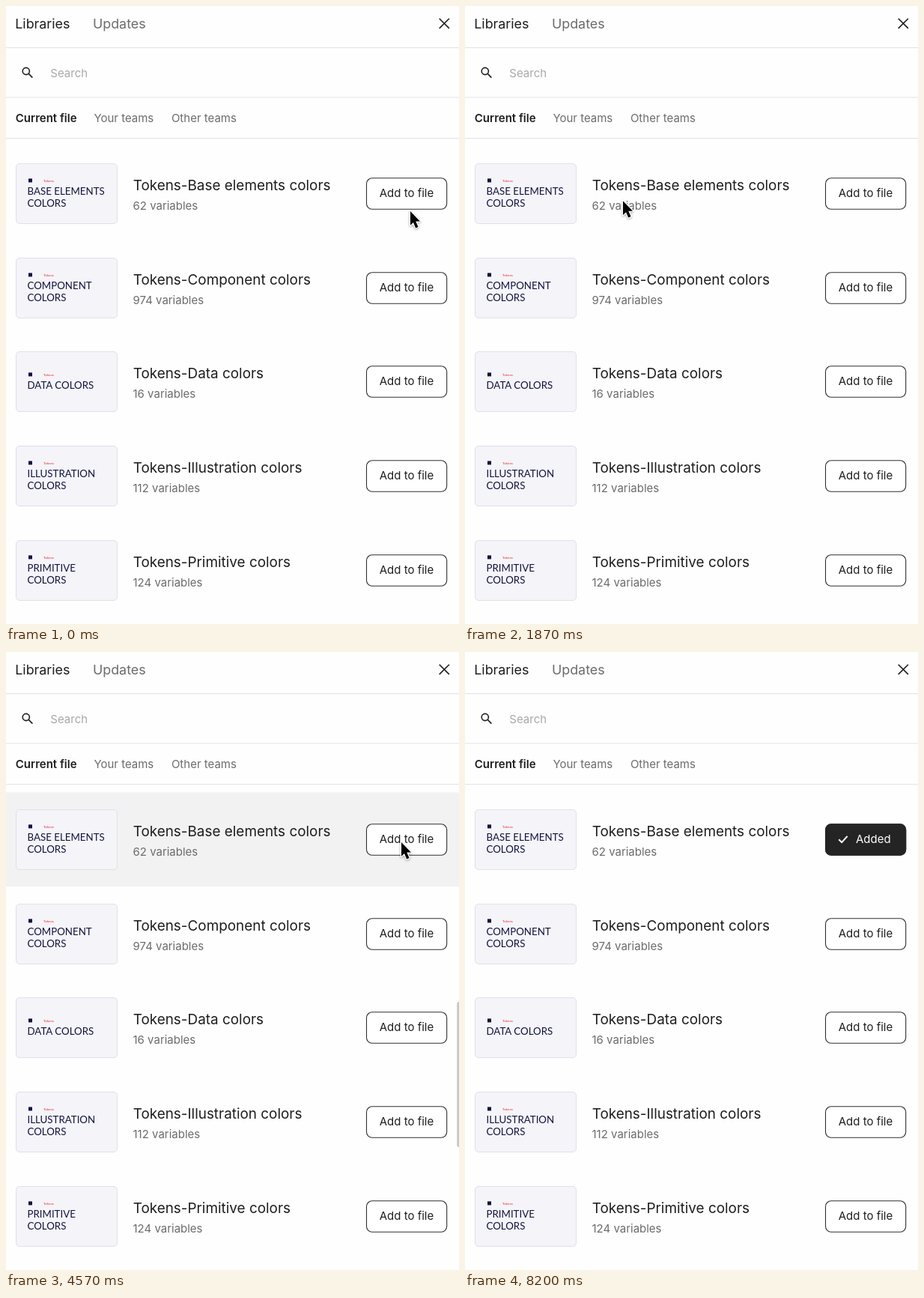
An HTML page that plays this animation: 605x825 px, repeating every 8230 ms.

```html
<!DOCTYPE html>
<html lang="en">
<head>
<meta charset="utf-8">
<title>Libraries</title>
<style>
  html, body { margin: 0; width: 100%; height: 100%; overflow: hidden; background: #fefefe; }
  svg { display: block; font-family: Inter, sans-serif; font-optical-sizing: none; }
  text { fill: #1e1e1e; font-size: 15px; white-space: pre; }
  .head { font-size: 17.9px; }
  .title { font-size: 18.9px; }
  .gray { fill: #6c6c6c; }
  .hint { fill: #a9a9a9; }
  .bold { font-weight: 600; }
  .mid { text-anchor: middle; }
  .thumb { font: 13.3px Lato, sans-serif; fill: #14143f; }
  .tag { font: bold 4.5px Lato, sans-serif; fill: #f0595f; }
  .card { fill: #f4f4f9; stroke: #e1e0e9; }
  .button { fill: #fff; stroke: #303030; stroke-width: 1.1; }
  .line { stroke: #e6e6e6; stroke-width: 1.2; }
  .icon { fill: none; stroke: #1e1e1e; stroke-width: 1.6; }
  #cursor { filter: drop-shadow(0 1.5px 1.5px rgba(0, 0, 0, .35)); }
</style>
</head>
<body>
<svg id="stage" width="605" height="825" viewBox="0 0 605 825"></svg>
<script>
const LOOP = 8230;
const ROW_TOP = 187.5, PITCH = 125.65;
const HOVER_START = 3400, ADDED_AT = 5200, EXIT_AT = 7100;

const rows = [
  ['Base elements', 62, ['BASE ELEMENTS', 'COLORS']],
  ['Component', 974, ['COMPONENT', 'COLORS']],
  ['Data', 16, ['DATA COLORS']],
  ['Illustration', 112, ['ILLUSTRATION', 'COLORS']],
  ['Primitive', 124, ['PRIMITIVE', 'COLORS']]
];

// Pointer stops: time, x, y
const path = [
  [0, 539, 272], [430, 240, 150], [860, 542, 194], [1430, 150, 251],
  [1700, 170, 258], [2330, 404, 259], [2500, 450, 262], [3150, 539, 262],
  [3900, 532, 244], [4300, 548, 254], [4570, 527, 252], [5300, 527, 252],
  [5830, 453.5, 320], [6200, 420, 302], [6570, 406, 270], [6750, 430, 230],
  [EXIT_AT, 606, 78]
];

const text = (x, y, cls, label) => `<text x="${x}" y="${y}" class="${cls}">${label}</text>`;
const line = y => `<path class="line" d="M0 ${y}H605"/>`;

function header() {
  return text(12.2, 30.2, 'head', 'Libraries') + text(115.9, 30.2, 'head gray', 'Updates') +
    '<path class="icon" d="M578.7 16.7l13.2 13.2m0-13.2l-13.2 13.2"/>' + line(55.6) +
    '<g class="icon"><circle cx="26.8" cy="87" r="4.6"/><path d="M30.2 90.4l5.2 5.2"/></g>' +
    text(59.3, 94.6, 'hint', 'Search') + line(122) +
    text(12.8, 155, 'bold', 'Current file') + text(117.4, 154.7, 'gray', 'Your teams') +
    text(220.9, 154.7, 'gray', 'Other teams') + line(176.6);
}

function row([name, count, words], i) {
  const shift = words.length === 1 ? 8 : 0;
  const thumb = words.map((w, k) => text(28.5, 252 + shift + k * 16, 'thumb', w)).join('');
  return `<g transform="translate(0 ${Math.round(i * PITCH)})">
    <rect class="card" x="13.5" y="210.5" width="135" height="80" rx="4.5"/>
    <rect x="30" y="${230.4 + shift}" width="5" height="5" fill="#14143f"/>
    ${text(50, 235.1 + shift, 'tag', 'Tokens')}${thumb}
    ${text(169.7, 246, 'title', `Tokens-${name} colors`)}
    ${text(169.5, 271.8, 'gray', `${count} variables`)}
    <rect class="button" x="481.5" y="229.8" width="107.2" height="41.5" rx="7.5"/>
    ${text(535, 255.3, 'mid', 'Add to file')}
  </g>`;
}

document.getElementById('stage').innerHTML = `
  <rect id="hover" width="605" height="${PITCH}" fill="#f2f2f2"/>
  ${header()}${rows.map(row).join('')}
  <g id="added">
    <rect x="481" y="229.3" width="108.2" height="42.4" rx="8" fill="#242424"/>
    <path d="M499.3 250.2l3.9 3.9 7.4-8.2" fill="none" stroke="#fff" stroke-width="2"/>
    <text x="522" y="255.3" style="fill:#fff">Added</text>
  </g>
  <rect id="bar" x="602.3" y="467" width="6" height="194" rx="3" fill="#c6c6c6"/>
  <path id="cursor" d="M1 2V20.8L5 17 8.2 24.4 11.5 22.9 8.3 15.6H14Z" fill="#000"
    stroke="#fff" stroke-width="2.4" stroke-linejoin="round" paint-order="stroke"/>`;

const [hover, added, bar, cursor] = ['hover', 'added', 'bar', 'cursor'].map(id => document.getElementById(id));
const show = (el, on) => el.setAttribute('visibility', on ? 'visible' : 'hidden');

function pointerAt(t) {
  const next = path.findIndex(p => p[0] > t);
  if (next < 0) return path[path.length - 1].slice(1);
  const [t0, x0, y0] = path[next - 1], [t1, x1, y1] = path[next];
  const k = (1 - Math.cos(Math.PI * (t - t0) / (t1 - t0))) / 2;
  return [x0 + (x1 - x0) * k, y0 + (y1 - y0) * k];
}

function draw(t) {
  const [x, y] = pointerAt(t);
  const index = Math.floor((y - ROW_TOP) / PITCH);
  const active = t >= HOVER_START && t < EXIT_AT;
  cursor.setAttribute('transform', `translate(${x} ${y})`);
  hover.setAttribute('y', ROW_TOP + index * PITCH);
  show(cursor, t < EXIT_AT);
  show(hover, active && index >= 0);
  show(bar, active);
  show(added, t >= ADDED_AT);
}

const start = performance.now();
function tick() {
  draw((performance.now() - start) % LOOP);
  requestAnimationFrame(tick);
}
tick();
</script>
</body>
</html>
```
